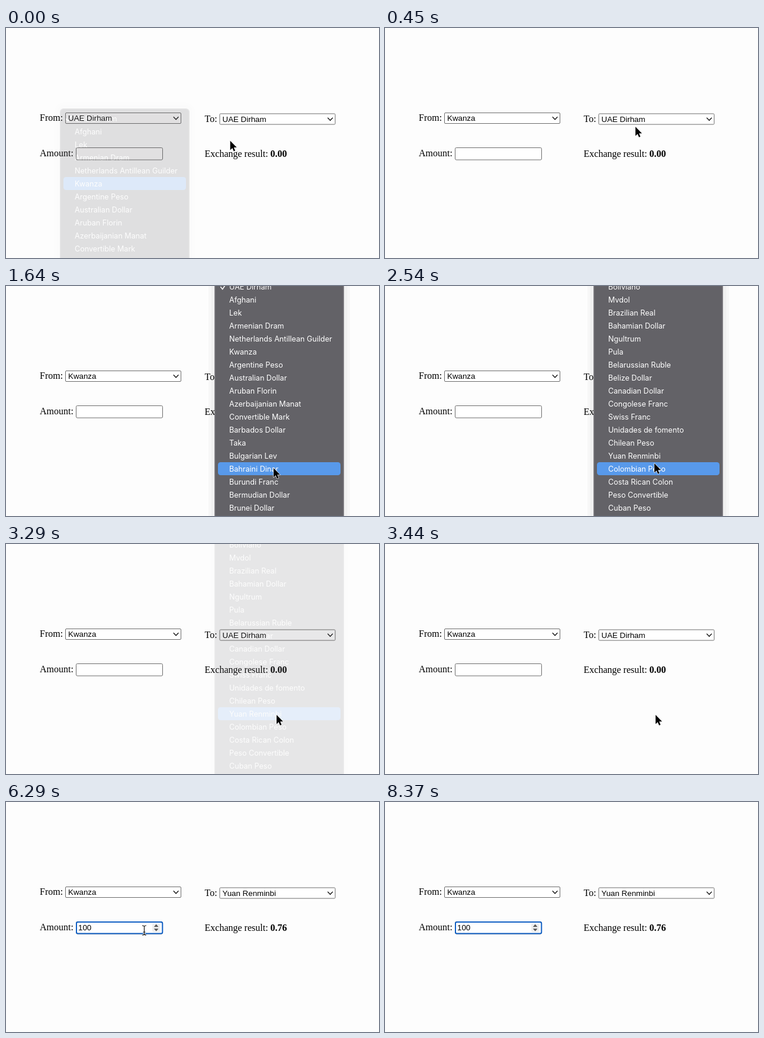
Animation of 630 by 389 pixels, one loop 8.68 s. Source, as an HTML page:

```html
<!DOCTYPE html>
<html lang="en">
<head>
<meta charset="utf-8">
<title>Currency converter</title>
<style>
  html, body { margin: 0; width: 100%; height: 100%; overflow: hidden; background: #fdfdfd; }
  svg { display: block; width: 630px; height: 389px; }
  text { white-space: pre; }
  .label { font: 16px "Liberation Serif", Times, serif; }
  .field { font: 13.333px "Liberation Sans", Arial, sans-serif; }
  .item { font: 12.6px Inter, sans-serif; fill: #fff; }
  .box { fill: #fff; stroke: #6c6c6c; }
  .line { fill: none; stroke: #111; stroke-width: 1.3; }
</style>
</head>
<body>
<svg viewBox="0 0 630 389">
  <text class="label" x="57" y="157">From:</text>
  <rect class="box" x="100.5" y="143.5" width="195" height="18" rx="1.5"/>
  <text class="field" id="from" x="105" y="157.3"></text>
  <path class="line" d="M282.8 150.3l4.3 4.4 4.3-4.4"/>

  <text class="label" x="335.5" y="158.5">To:</text>
  <rect class="box" x="361" y="145" width="195" height="18" rx="1.5"/>
  <text class="field" id="to" x="365.5" y="158.6"></text>
  <path class="line" d="M543.3 151.8l4.3 4.4 4.3-4.4"/>

  <text class="label" x="57" y="217">Amount:</text>
  <rect class="box" x="118.5" y="202.5" width="146" height="20.5" rx="2"/>
  <rect id="focus" x="119" y="203" width="145.3" height="19.6" rx="2.5" fill="none" stroke="#1160c4" stroke-width="2"/>
  <g id="spinner">
    <rect x="247" y="206" width="13.5" height="14" rx="2" fill="#efefef"/>
    <path d="M249.8 211.2l3.9-4.4 3.9 4.4zM249.8 214.2l3.9 4.4 3.9-4.4z" fill="#555"/>
  </g>
  <text class="field" id="amount" x="122" y="217.3"></text>
  <rect id="caret" y="205" width="1" height="16"/>

  <text class="label" x="335.5" y="218">Exchange result: <tspan id="result" font-weight="bold"></tspan></text>

  <g id="menu">
    <g fill="none" stroke="#000" stroke-opacity=".025">
      <rect x="352" y="138" width="219" height="1200" rx="6" stroke-width="20"/>
      <rect x="352" y="138" width="219" height="1200" rx="6" stroke-width="11"/>
    </g>
    <rect x="352.7" y="138.7" width="217.6" height="1200" rx="5.5" fill="#636267" stroke="#88878b" stroke-width="1.4"/>
    <rect id="highlight" x="358" width="207" height="22" rx="4.5" fill="#5899ea"/>
    <path d="M362.7 155.8l3 3.6 5.6-8.4" fill="none" stroke="#fff" stroke-width="1.6" stroke-linecap="round"/>
  </g>

  <path id="arrow" d="M0 0V15.6L3.6 12.2 6 17.7 8.4 16.7 6.1 11.3H11Z" stroke="#fff" stroke-width="1.2" stroke-linejoin="round" paint-order="stroke"/>
  <g id="beam" fill="none">
    <path d="M-3.5-8Q0-8 0-6Q0-8 3.5-8M0-6V6M-3.5 8Q0 8 0 6Q0 8 3.5 8M-2 3H2" stroke="#fff" stroke-width="3"/>
    <path d="M-3.5-8Q0-8 0-6Q0-8 3.5-8M0-6V6M-3.5 8Q0 8 0 6Q0 8 3.5 8M-2 3H2" stroke="#111" stroke-width="1.2"/>
  </g>
</svg>
<script>
const LOOP = 8680, ROW = 22, FIRST_ROW = 144;
const $ = id => document.getElementById(id);

const currencies = ("UAE Dirham,Afghani,Lek,Armenian Dram,Netherlands Antillean Guilder,Kwanza,Argentine Peso," +
  "Australian Dollar,Aruban Florin,Azerbaijanian Manat,Convertible Mark,Barbados Dollar,Taka,Bulgarian Lev," +
  "Bahraini Dinar,Burundi Franc,Bermudian Dollar,Brunei Dollar,Boliviano,Mvdol,Brazilian Real,Bahamian Dollar," +
  "Ngultrum,Pula,Belarussian Ruble,Belize Dollar,Canadian Dollar,Congolese Franc,Swiss Franc," +
  "Unidades de fomento,Chilean Peso,Yuan Renminbi,Colombian Peso,Costa Rican Colon,Peso Convertible,Cuban Peso").split(",");

currencies.forEach((name, i) => {
  const item = document.createElementNS("http://www.w3.org/2000/svg", "text");
  item.setAttribute("class", "item");
  item.setAttribute("x", 377);
  item.setAttribute("y", FIRST_ROW + i * ROW + 15.6);
  item.textContent = name;
  $("menu").append(item);
});

// Each step overrides only the values that change at its time.
const steps = [
  [0, { from: "UAE Dirham", to: "UAE Dirham", amount: "", result: "0.00", caret: 0, focus: 0, spinner: 0,
        pointer: "arrow", at: [378.7, 190.8], menu: .19, shift: [-261, -2], row: 5 }],
  [150, { menu: 0, at: [401, 180] }],
  [450, { from: "Kwanza", at: [423, 167] }],
  [600, { at: [436, 160] }],
  [740, { at: [442.5, 156.8] }],
  [890, { menu: 1, shift: [0, 0], row: 0 }],
  [1190, { at: [447, 226], row: 3 }],
  [1340, { at: [452, 308], row: 7 }],
  [1640, { shift: [0, -154], row: 14 }],
  [1790, { shift: [0, -440], row: 27 }],
  [1940, { shift: [0, -550], row: 32 }],
  [2390, { at: [453, 306] }],
  [2540, { at: [455, 300] }],
  [2690, { at: [456, 293], row: 31 }],
  [2840, { at: [457, 289] }],
  [3290, { menu: .14 }],
  [3440, { menu: 0 }],
  [3590, { to: "Yuan Renminbi", at: [440, 281] }],
  [3740, { at: [340, 248] }],
  [3890, { pointer: "beam", at: [243, 219], spinner: 1 }],
  [4040, { at: [233.5, 217], focus: 1, caret: 1 }],
  [4490, { caret: 0 }],
  [4940, { caret: 1 }],
  [5540, { amount: "1" }],
  [5690, { amount: "10", result: "0.01" }],
  [5840, { amount: "100", result: "0.08" }],
  [5990, { result: "0.76" }],
  [6290, { caret: 0 }],
  [6440, { pointer: "arrow", at: [296, 221] }],
  [6590, { at: [352.5, 219] }],
  [6890, { caret: 1 }],
  [7040, { at: [351, 205] }],
  [7190, { at: [347, 184] }],
  [7340, { at: [345, 173], caret: 0 }],
  [7790, { at: [420, 260], caret: 1 }],
  [7930, { at: [516, 368] }],
  [8230, { at: [529, 382], caret: 0 }],
  [8370, { pointer: "" }]
];

let state = {};
const states = steps.map(([time, change]) => [time, state = { ...state, ...change }]);

const show = (id, opacity) => $(id).setAttribute("opacity", opacity);
const move = (id, [x, y]) => $(id).setAttribute("transform", `translate(${x} ${y})`);

function draw(s) {
  for (const id of ["from", "to", "amount", "result"]) $(id).textContent = s[id];
  for (const id of ["caret", "focus", "spinner", "menu"]) show(id, s[id]);
  for (const id of ["arrow", "beam"]) {
    show(id, s.pointer === id ? 1 : 0);
    move(id, s.at);
  }
  $("caret").setAttribute("x", 122 + 7 * s.amount.length);
  move("menu", s.shift);
  $("highlight").setAttribute("y", FIRST_ROW + s.row * ROW);
}

const start = performance.now();
let shown;
function tick(now) {
  const time = Math.max(0, now - start) % LOOP;
  const current = states.findLast(([from]) => from <= time)[1];
  if (current !== shown) draw(shown = current);
  requestAnimationFrame(tick);
}
tick(start);
</script>
</body>
</html>
```
